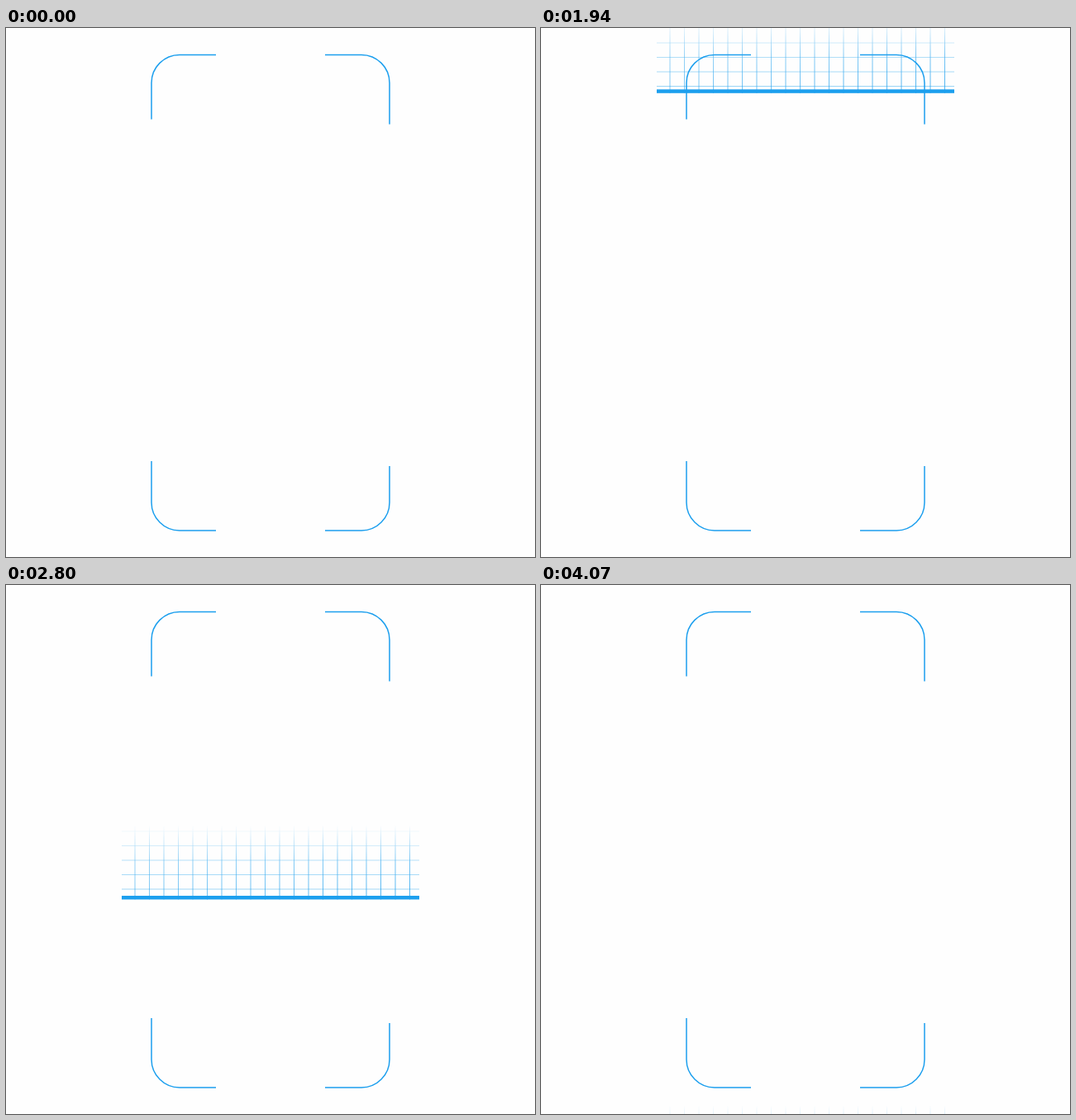
Recreate the animation shown at these times as an HTML page. Size 640 by 640 pixels, loop 4.18 s.

```html
<!DOCTYPE html>
<html lang="en">
<head>
<meta charset="utf-8">
<title>Scanner</title>
<style>
  html, body { margin: 0; width: 100%; height: 100%; overflow: hidden; background: #fefefe; }
  svg { display: block; width: 100vw; height: 100vh; }
  path { fill: none; stroke: #1c9fee; }
  #corners { stroke-width: 1.5; }
  #columns { stroke: url(#ramp); stroke-width: .9; }
  #rows { stroke-width: .9; stroke-opacity: .5; }
</style>
</head>
<body>
<svg viewBox="0 0 640 640">
  <defs>
    <linearGradient id="fade" x1="0" y1="0" x2="0" y2="1">
      <stop offset="0" stop-color="#fff" stop-opacity="0"/>
      <stop offset=".5" stop-color="#fff" stop-opacity=".75"/>
      <stop offset="1" stop-color="#fff"/>
    </linearGradient>
    <linearGradient id="ramp" gradientUnits="userSpaceOnUse" x1="140" y1="0" x2="500" y2="0">
      <stop offset="0" stop-color="#1c9fee" stop-opacity=".65"/>
      <stop offset="1" stop-color="#1c9fee" stop-opacity=".9"/>
    </linearGradient>
    <mask id="beam" maskUnits="userSpaceOnUse" x="0" y="0" width="640" height="640">
      <rect class="moving" x="140" y="-90" width="360" height="90" fill="url(#fade)"/>
    </mask>
  </defs>
  <g mask="url(#beam)">
    <path id="columns"/>
    <path id="rows"/>
  </g>
  <path id="corners" d="M176 110.5V66.4A34 34 0 0 1 210 32.4H254
    M386 32.4H430A34 34 0 0 1 464 66.4V116.5
    M464 530V574A34 34 0 0 1 430 608H386
    M254 608H210A34 34 0 0 1 176 574V524"/>
  <rect class="moving" x="140" y="-4.5" width="360" height="4.5" fill="#1c9fee"/>
</svg>
<script>
  const LOOP = 4180, REST = 1000, SWEEP = 3070, STEPS = 77;
  const TRAVEL = 725, CELL = 17.5;

  const repeat = (n, draw) => Array.from({ length: n }, (_, i) => draw(i)).join('');
  const byId = id => document.getElementById(id);
  byId('columns').setAttribute('d', repeat(20, i => `M${156 + i * CELL} 0V640`));
  byId('rows').setAttribute('d', repeat(30, i => `M140 ${18 + i * CELL}H500`));

  const bezier = (a, b, t) => 3 * (1 - t) * t * ((1 - t) * a + t * b) + t ** 3;

  // Same as CSS cubic-bezier(.69, .115, .385, .632).
  function ease(x) {
    let low = 0, high = 1;
    for (let i = 0; i < 30; i++) {
      const mid = (low + high) / 2;
      if (bezier(.69, .385, mid) < x) low = mid; else high = mid;
    }
    return bezier(.115, .632, low);
  }

  // Lower edge of the beam, which advances in even held steps.
  function edgeAt(time) {
    if (time < REST) return -10;
    const step = Math.min(STEPS, Math.floor((time - REST) / SWEEP * STEPS + .3));
    return TRAVEL * ease((step + 1) / (STEPS + 2));
  }

  const moving = document.querySelectorAll('.moving');
  const start = performance.now();

  function render() {
    const y = edgeAt((performance.now() - start) % LOOP);
    moving.forEach(el => el.setAttribute('transform', `translate(0 ${y.toFixed(2)})`));
    requestAnimationFrame(render);
  }
  render();
</script>
</body>
</html>
```
